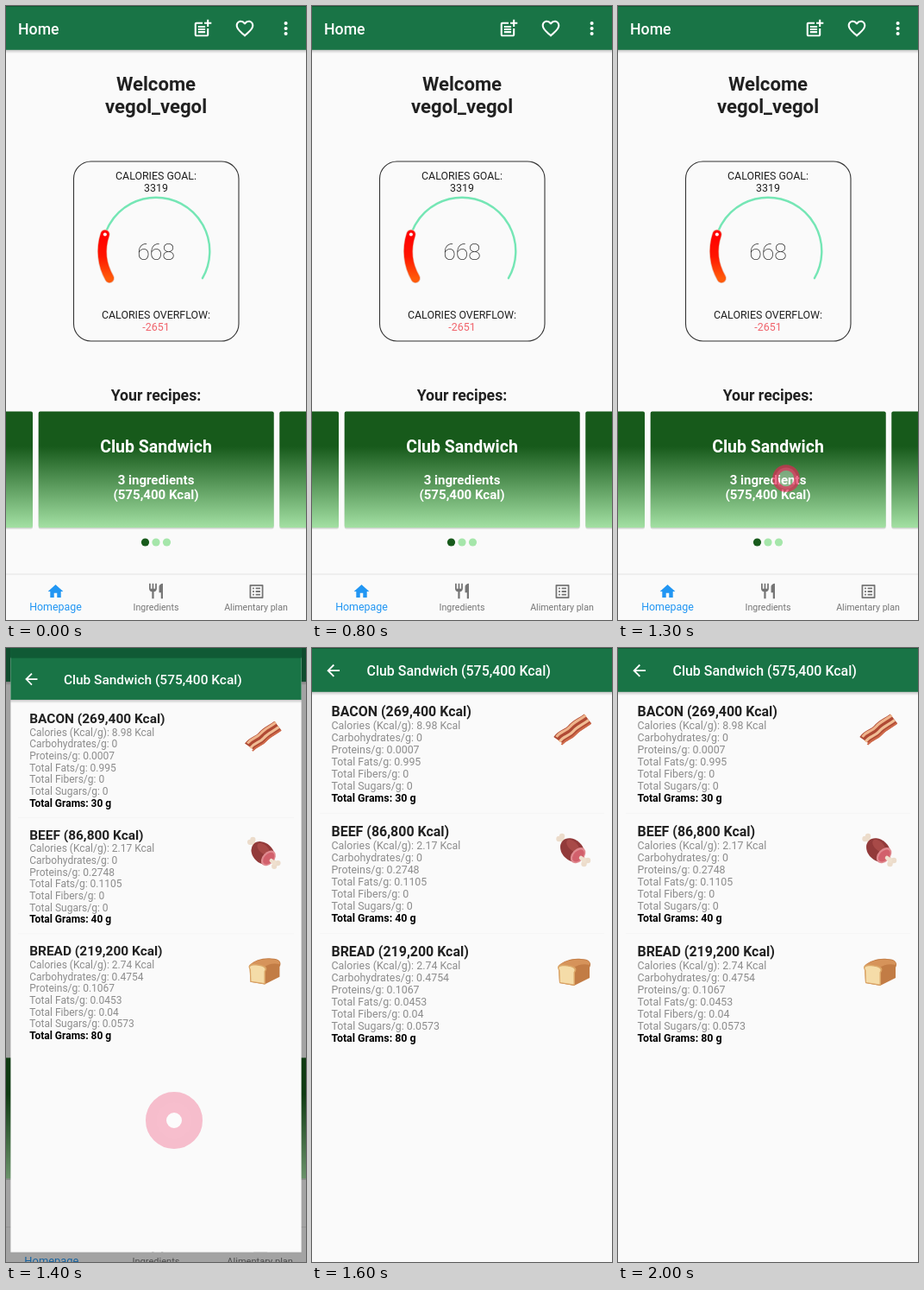
Recreate the animation shown at these times as an HTML page. Size 348 by 711 pixels, loop 2.6 s.

```html
<!DOCTYPE html>
<html lang="en">
<head>
<meta charset="utf-8">
<title>Calorie tracker</title>
<style>
  html, body { margin: 0; height: 100%; overflow: hidden; background: #fafafa; }
  svg { display: block; width: 100vw; height: 100vh; font-family: Roboto, sans-serif; }
</style>
</head>
<body>
<svg id="stage" viewBox="0 0 348 711"></svg>
<script>
const LOOP = 2600, STEP = 100, TAP = 1300, OPEN = 1400;
const stage = document.getElementById('stage');

const icons = {
  add: 'M17 19.2H5V7h7V5H5c-1.1 0-2 .9-2 2v12c0 1.1.9 2 2 2h12c1.1 0 2-.9 2-2v-7h-2zM19 2h-2v3h-3v2h3v3h2V7h3V5h-3zM7 9h8v2H7zM7 12v2h8v-2zM7 15h8v2H7z',
  heart: 'M16.5 3c-1.74 0-3.41.81-4.5 2.09C10.91 3.81 9.24 3 7.5 3 4.42 3 2 5.42 2 8.5c0 3.78 3.4 6.86 8.55 11.54L12 21.35l1.45-1.32C18.6 15.36 22 12.28 22 8.5 22 5.42 19.58 3 16.5 3zm-4.4 15.55l-.1.1-.1-.1C7.14 14.24 4 11.39 4 8.5 4 6.5 5.5 5 7.5 5c1.54 0 3.04.99 3.57 2.36h1.87C13.46 5.99 14.96 5 16.5 5c2 0 3.5 1.5 3.5 3.5 0 2.89-3.14 5.74-7.9 10.05z',
  back: 'M20 11H7.83l5.59-5.59L12 4l-8 8 8 8 1.41-1.41L7.83 13H20z',
  home: 'M10 20v-6h4v6h5v-8h3L12 3 2 12h3v8z',
  cutlery: 'M11 9H9V2H7v7H5V2H3v7c0 2.12 1.66 3.84 3.75 3.97V22h2.5v-9.03C11.34 12.84 13 11.12 13 9V2h-2zm5-3v8h2.5v8H21V2c-2.76 0-5 2.24-5 4z',
  list: 'M19 5v14H5V5h14m1.1-2H3.9c-.5 0-.9.4-.9.9v16.2c0 .4.4.9.9.9h16.2c.4 0 .9-.5.9-.9V3.9c0-.5-.5-.9-.9-.9zM11 7h6v2h-6zm0 4h6v2h-6zm0 4h6v2h-6zM7 7h2v2H7zm0 4h2v2H7zm0 4h2v2H7z'
};

const text = (x, y, size, str, fill = '#212121', weight = 400, anchor = 'middle') =>
  `<text x="${x}" y="${y}" font-size="${size}" fill="${fill}" font-weight="${weight}" text-anchor="${anchor}">${str}</text>`;
const rect = (x, y, w, h, fill, extra = '') =>
  `<rect x="${x}" y="${y}" width="${w}" height="${h}" fill="${fill}" ${extra}/>`;
const circle = (x, y, r, fill) => `<circle cx="${x}" cy="${y}" r="${r}" fill="${fill}"/>`;
const path = (d, fill, extra = '') => `<path d="${d}" fill="${fill}" ${extra}/>`;
const line = (d, color, width, cap = 'round') =>
  path(d, 'none', `stroke="${color}" stroke-width="${width}" stroke-linecap="${cap}"`);
const icon = (name, x, y, scale, fill) =>
  path(icons[name], fill, `transform="translate(${x} ${y}) scale(${scale}) translate(-12 -12)"`);

const appBar = rect(0, 50, 348, 5, 'url(#shade)') + rect(0, -22, 348, 72.8, '#197446') +
  rect(0, -22, 348, 23, '#105a35');

// Arc on the gauge circle, angles in degrees clockwise from the right
function arc(from, to) {
  const point = deg => {
    const a = deg * Math.PI / 180;
    return `${174 + 62.3 * Math.cos(a)} ${284 + 62.3 * Math.sin(a)}`;
  };
  return `M${point(from)}A62.3 62.3 0 ${to - from > 180 ? 1 : 0} 1 ${point(to)}`;
}

function gauge(value, goal) {
  const end = 150 + 240 * value / goal;
  const a = end * Math.PI / 180;
  return rect(78.5, 180, 191.5, 208, 'none', 'rx="20" stroke="#333" stroke-width="1.1"') +
    text(174, 201, 12.4, 'CALORIES GOAL:') + text(174, 215.3, 12.4, goal) +
    line(arc(150, 390), '#75e6b5', 2.4) +
    line(arc(150, end), '#e9b9a8', 11.5) + line(arc(150, end), 'url(#heat)', 10) +
    circle(174 + 62.3 * Math.cos(a), 284 + 62.3 * Math.sin(a), 2, '#fff') +
    text(174, 294, 26.6, value, '#212121', 100) +
    text(174, 362, 12.4, 'CALORIES OVERFLOW:') + text(174, 376.3, 12.4, value - goal, '#f0646c');
}

const recipeCard = x => rect(x, 471, 273, 134.5, '#cfd6cf', 'rx="2"') +
  rect(x, 469.5, 273, 134.5, 'url(#leaf)', 'rx="2"');

const homePage = rect(0, 0, 348, 711, '#fafafa') + appBar +
  text(14, 33, 17.7, 'Home', '#fff', 500, 'start') +
  icon('add', 228, 26, 1.03, '#fff') + icon('heart', 277, 26, 1.03, '#fff') +
  [20, 26, 32].map(y => circle(324.6, y, 2.05, '#fff')).join('') +
  text(174, 98, 22.15, 'Welcome', '#212121', 700) +
  text(174, 123.5, 22.15, 'vegol_vegol', '#212121', 700) +
  gauge(668, 3319) +
  text(174, 457, 17.7, 'Your recipes:', '#212121', 700) +
  [-242, 37.7, 317.3].map(recipeCard).join('') +
  text(174, 517, 19.5, 'Club Sandwich', '#fff', 700) +
  text(174, 553.5, 15.06, '3 ingredients', '#fff', 700) +
  text(174, 571, 15.06, '(575,400 Kcal)', '#fff', 700) +
  [161.5, 174, 186.5].map((x, i) => circle(x, 621, 4.6, i ? '#a5e6aa' : '#175a1b')).join('') +
  rect(0, 658, 348, 53, '#fafafa') + rect(0, 657.5, 348, 1, '#e3e3e3') +
  icon('home', 57.5, 678, .886, '#2196f3') + text(57.5, 699.5, 12.4, 'Homepage', '#2196f3') +
  icon('cutlery', 174, 677.5, .886, '#757575') + text(174, 700, 10.63, 'Ingredients', '#757575') +
  icon('list', 290.5, 678, .886, '#757575') + text(290, 700, 10.63, 'Alimentary plan', '#757575');

const strip = 'M286 107c5-7 11-6 16-12s10-7 18-13';
const bacon = line(strip, '#b04a34', 14, 'butt') +
  `<g transform="translate(-2.5 -4)">${line(strip, '#efb48c', 3, 'butt')}</g>` +
  `<g transform="translate(1 1.5)">${line(strip, '#f0bd95', 3.2, 'butt')}</g>` +
  `<g transform="translate(3.5 5)">${line(strip, '#cf6a4a', 2, 'butt')}</g>`;
const beef = line('M289 82L318 108', '#efe0cf', 5) +
  [[286.5, 82], [290, 79], [315.5, 111], [320, 107]].map(([x, y]) => circle(x, y, 3.2, '#ecdccb')).join('') +
  '<g transform="translate(302 95) rotate(43)"><ellipse rx="15.5" ry="12" fill="#923a3a"/>' +
  '<ellipse cx="-3" cy="-4" rx="9" ry="5" fill="#a84a48"/>' +
  '<ellipse cx="9" rx="7" ry="10.5" fill="#e08a90"/><ellipse cx="9.5" rx="5.3" ry="8.3" fill="#d2606c"/></g>' +
  line('M312 104L316 107.5', '#efe0cf', 4.5);
const bread = path('M286 90C292 84 302 81 312 82C322 82 325 87 322 92V104L304 113L287 110Z', '#c27c45') +
  path('M287 89C294 84 304 82 313 83C320 83 323 86 322 89C315 87 308 89 304 92Z', '#d6935a') +
  path('M286 95c-4-7 5-7 10-6s14 2 9 9v15l-18-3z', '#dba566') +
  path('M287.5 95c-4-5 4-5 8-4.500s12 2 8 7v14l-15.500-2.500z', '#f5dca8');

const foods = [
  ['BACON (269,400 Kcal)', [8.98, 0, .0007, .995, 0, 0], 30, bacon],
  ['BEEF (86,800 Kcal)', [2.17, 0, .2748, .1105, 0, 0], 40, beef],
  ['BREAD (219,200 Kcal)', [2.74, .4754, .1067, .0453, .04, .0573], 80, bread]
];
const labels = ['Calories (Kcal/g)', 'Carbohydrates/g', 'Proteins/g', 'Total Fats/g', 'Total Fibers/g', 'Total Sugars/g'];

const foodRow = ([title, values, grams, picture], i) => `<g transform="translate(0 ${139 * i})">` +
  text(22.5, 78.6, 15.95, title, '#212121', 700, 'start') +
  labels.map((label, n) =>
    text(22.5, 93.9 + 14.08 * n, 12.4, `${label}: ${values[n]}${n ? '' : ' Kcal'}`, '#8c8c8c', 400, 'start')).join('') +
  text(22.5, 178.4, 12.4, `Total Grams: ${grams} g`, '#000', 700, 'start') +
  (i < 2 ? rect(9, 191, 330, 1, '#f5f5f5') : '') + picture + '</g>';

const recipePage = rect(0, 0, 348, 711, '#fafafa') + appBar +
  icon('back', 24.7, 26.2, .92, '#fff') +
  text(63.5, 32, 15.95, 'Club Sandwich (575,400 Kcal)', '#fff', 500, 'start') +
  foods.map(foodRow).join('');

const gradient = (id, stops) => `<linearGradient id="${id}" x2="0" y2="1">` +
  stops.map(([at, color, alpha = 1]) => `<stop offset="${at}" stop-color="${color}" stop-opacity="${alpha}"/>`).join('') +
  '</linearGradient>';

stage.innerHTML = '<defs>' +
  gradient('shade', [[0, '#000', .25], [1, '#000', 0]]) +
  gradient('heat', [[0, '#f00'], [.5, '#ff1500'], [1, '#ff5a0a']]) +
  gradient('leaf', [[0, '#175a1b'], [.3, '#175a1b'], [1, '#a3e0a3']]) + '</defs>' +
  `<g id="home">${homePage}</g>` + rect(0, 0, 348, 711, '#000', 'id="scrim"') +
  `<g id="recipe">${recipePage}</g>` +
  '<circle id="touch" cx="195" cy="547" fill="#fff" fill-opacity=".3" stroke="#e91e55"/>';

const [home, scrim, recipe, touch] = ['home', 'scrim', 'recipe', 'touch'].map(id => document.getElementById(id));
const set = (el, attrs) => Object.entries(attrs).forEach(([key, value]) => el.setAttribute(key, value));
// Pages zoom about the middle of the full screen, status bar included
const zoom = s => `translate(174 345) scale(${s}) translate(-174 -345)`;

function draw(now) {
  const t = Math.floor(now % LOOP / STEP) * STEP;
  const opened = t >= OPEN;
  const rest = opened ? .15 ** ((t - OPEN) / STEP) : 1;
  set(home, { transform: zoom(opened ? 1.05 - .01 * rest : 1) });
  set(scrim, { opacity: opened ? .6 - .25 * rest : 0 });
  set(recipe, { transform: zoom(t > 1500 ? 1 : 1 - .031 * rest), visibility: opened ? 'visible' : 'hidden' });

  const spread = (t - TAP) / STEP;
  set(touch, {
    visibility: spread >= 0 && spread <= 1 ? 'visible' : 'hidden',
    r: Math.max(0, 12.5 + 8.5 * spread),
    'stroke-width': Math.max(0, 6.5 + 17.5 * spread),
    'stroke-opacity': Math.max(0, .65 - .37 * spread)
  });
  requestAnimationFrame(draw);
}
requestAnimationFrame(draw);
</script>
</body>
</html>
```
